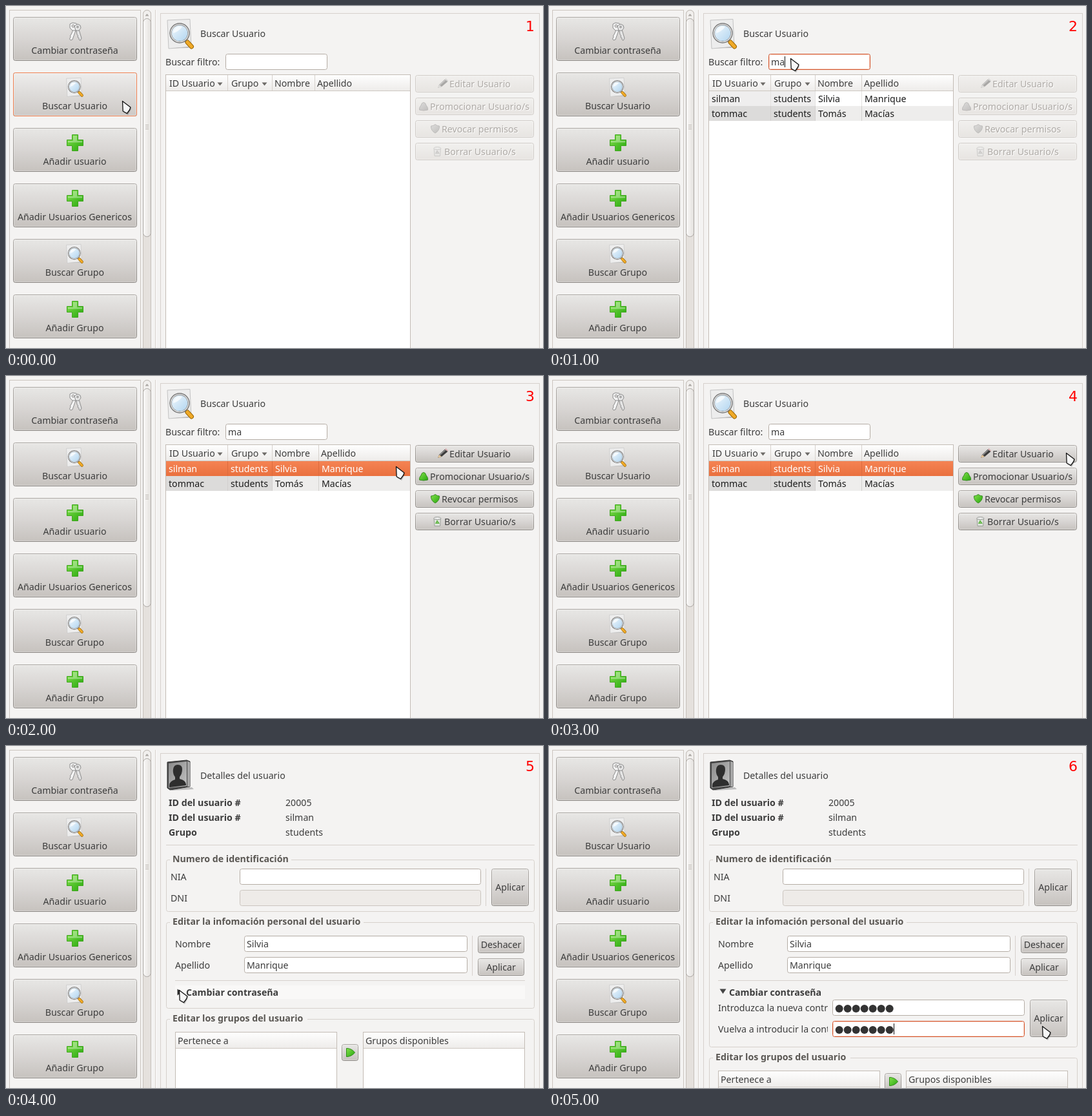
An HTML page for the animation above (6000 ms loop, 832 by 530 pixels).

```html
<!DOCTYPE html>
<html lang="es">
<head>
<meta charset="utf-8">
<title>Gestor de usuarios</title>
<style>
html, body { margin: 0; width: 100%; height: 100%; overflow: hidden; background: #f4f3f2; }
svg { display: block; width: 832px; height: 530px; }
text { font: 14.2px "Noto Sans", sans-serif; fill: #3c3c3c; white-space: pre; }
.bold { font-weight: 700; }
.legend { font-weight: 700; fill: #5a5753; }
.mid { text-anchor: middle; }
.off { fill: #aeaaa6; }
.emboss { fill: #fff; }
.cell { fill: #1c1c1c; }
.picked { fill: #fff; }
.step { font: 22px "DejaVu Sans", sans-serif; fill: #f00; }
.timed { visibility: hidden; animation: 6s step-end infinite; }
@keyframes show1 { 0% { visibility: visible } 16.6667%, 100% { visibility: hidden } }
@keyframes show2 { 0% { visibility: visible } 33.3333%, 100% { visibility: hidden } }
@keyframes show3 { 0% { visibility: visible } 50%, 100% { visibility: hidden } }
@keyframes show4 { 0% { visibility: visible } 66.6667%, 100% { visibility: hidden } }
</style>
</head>
<body>
<svg id="stage" viewBox="0 0 832 530">
<defs>
  <linearGradient id="face" x2="0" y2="1"><stop stop-color="#e8e7e5"/><stop offset=".5" stop-color="#d8d5d3"/><stop offset="1" stop-color="#c6c2be"/></linearGradient>
  <linearGradient id="edge" x2="0" y2="1"><stop stop-color="#aaa6a2"/><stop offset="1" stop-color="#8b8783"/></linearGradient>
  <linearGradient id="lit" x2="0" y2="1"><stop stop-color="#eeedec"/><stop offset="1" stop-color="#cdc9c6"/></linearGradient>
  <linearGradient id="faint" x2="0" y2="1"><stop stop-color="#f1f0ee"/><stop offset="1" stop-color="#e7e4e1"/></linearGradient>
  <linearGradient id="head" x2="0" y2="1"><stop stop-color="#fefefe"/><stop offset="1" stop-color="#eeecea"/></linearGradient>
  <linearGradient id="thumb" x2="1" y2="0"><stop stop-color="#fbfaf9"/><stop offset="1" stop-color="#e3e0dd"/></linearGradient>
  <linearGradient id="pick" x2="0" y2="1"><stop stop-color="#f58353"/><stop offset="1" stop-color="#e9703e"/></linearGradient>
  <linearGradient id="green" x2="1" y2="1"><stop stop-color="#84e04c"/><stop offset="1" stop-color="#27a80e"/></linearGradient>
  <linearGradient id="glass" x2="1" y2="1"><stop stop-color="#f4fafe"/><stop offset="1" stop-color="#aed3ef"/></linearGradient>
  <linearGradient id="cover" x2="1" y2="1"><stop stop-color="#8a8a8a"/><stop offset="1" stop-color="#c2c2c2"/></linearGradient>
  <clipPath id="labelClip"><path d="M255 390H432V460H255z"/></clipPath>

  <g id="search">
    <path d="M1 2 36 .5 38 43 3 46z" fill="#ededed" stroke="#c3c3c3"/>
    <path d="M6 45.5 38 43 33 45z" fill="#bbb"/>
    <path d="M28 32 33 37" stroke="#888" stroke-width="4"/>
    <path d="M32 36 38.5 43" stroke="#9b6708" stroke-width="7" stroke-linecap="round"/>
    <path d="M32 36 38.5 43" stroke="#f0aa28" stroke-width="5" stroke-linecap="round"/>
    <circle cx="20" cy="22" r="14" fill="url(#glass)" stroke="#777" stroke-width="3.4"/>
    <circle cx="20" cy="22" r="13.6" fill="none" stroke="#e9e9e9" stroke-width="1.4"/>
    <path d="M10 22A10 10 0 0 1 24 12.5Q18 20 10 22z" fill="#fff" opacity=".7"/>
  </g>
  <g id="plus">
    <path d="M8.500.5h9v8h8v9h-8v8h-9v-8h-8v-9h8z" fill="url(#green)" stroke="#3fa61f"/>
    <path d="M10 2h6v8h8v2.500H2V10h8z" fill="#fff" opacity=".35"/>
  </g>
  <g id="keys" stroke="#8c8c8c" fill-rule="evenodd">
    <path d="M7 12 11 13 7 24 6 27 3 28 1.500 26 3 23 2.500 21 4 19z" fill="#f5f5f5"/>
    <path d="M12 13 16 11.500 20 25 18 28.500 16 27 16 24.500 14 23.500 14.500 21 13 19z" fill="#e4e4e4"/>
    <path d="M2 3 6 1 12 2 14 7 11 13 6 13 2 9zM7 4a2 2 0 1 0 .1 0z" fill="#f2f2f2"/>
    <path d="M9 6 14 3 18 5 19 9 16 13 11 13zM14 6a1.500 1.500 0 1 0 .1 0z" fill="#e8e8e8"/>
  </g>
  <g id="pencil">
    <path d="M0 15 2 10 11 1.5 15.5 5 6 13z" fill="#3d3d3d"/>
    <path d="M3 10.5 12 2.5" stroke="#999" stroke-width="1.3"/>
    <path d="M0 15 2 10 6 13z" fill="#e6c79b"/>
    <path d="M11 1.5 12.5 0 16 3.5 15.5 5z" fill="#d9aeb0"/>
  </g>
  <path id="hill" d="M.5 12Q0 8 3 5Q4 .5 7 .5T11 5Q14 8 13.5 12Q7 14 .5 12z" fill="url(#green)" stroke="#378b22"/>
  <path id="shield" d="M.5 3Q4 3 7 .5Q10 3 13.5 3Q14 10 7 14Q0 10 .5 3z" fill="url(#green)" stroke="#378b22"/>
  <g id="bin">
    <path d="M1 3 2 14.5H10.5L11.5 3z" fill="#dfe3dd" stroke="#9a9d98"/>
    <ellipse cx="6.3" cy="2.5" rx="5.5" ry="1.9" fill="#f5f5f5" stroke="#8d908b"/>
    <path d="M4 10 6 6.5 8.5 10z" fill="none" stroke="#55b234" stroke-width="1.4"/>
  </g>
  <g id="pointer">
    <path d="M2 3 14.5 12 9 22 2 18z" opacity=".2"/>
    <path d="M.5.5 13 10 11.5 14 7.5 19.5 1.2 16z" fill="#f7f7f7" stroke="#111" stroke-width="1.3" stroke-linejoin="round"/>
  </g>
  <g id="profile">
    <path d="M4 46 39 43 42 46 8 48z" fill="#bbb"/>
    <path d="M1 4 31 1 36 3 36 42 5 47 1 44z" fill="#4a4a4a" stroke="#2c2c2c"/>
    <path d="M32 2.5 36 4 36 42 32 42z" fill="#a6a6a6"/>
    <path d="M3 6 31 3 31 41 3 44z" fill="url(#cover)"/>
    <path d="M4 40Q4 34 13 31L13 27Q9 22 10 15Q11 8 17 8Q24 8 24 15Q24 22 20 27L20 30Q29 32 30 38L30 40 4 43z" fill="#2e2e2e"/>
  </g>
</defs>
</svg>
<script>
const text = (x, y, label, cls = '') => `<text x="${x}" y="${y}" class="${cls}">${label}</text>`;
const use = (id, x, y, scale = 1, extra = '') =>
  `<use href="#${id}" transform="translate(${x} ${y}) scale(${scale})" ${extra}/>`;
const box = (x, y, w, h, fill, stroke = 'none', r = 0) =>
  `<rect x="${x + .5}" y="${y + .5}" width="${w - 1}" height="${h - 1}" rx="${r}" fill="${fill}" stroke="${stroke}"/>`;
const fill = (x, y, w, h, color) => `<rect x="${x}" y="${y}" width="${w}" height="${h}" fill="${color}"/>`;
const path = (d, color) => `<path d="${d}" fill="${color}"/>`;
const vline = (x, y, h, color = '#d6d1cc') => fill(x, y, 1, h, color);
const hline = (x, y, w, color = '#d6d1cc') => fill(x, y, w, 1, color);

// Visible from second `start` for `count` seconds of the loop.
const show = (start, count, markup) =>
  `<g class="timed" style="animation-name:show${count};animation-delay:${start - 6}s">${markup}</g>`;

const button = (x, y, w, h, face = 'face', edge = 'url(#edge)') =>
  box(x, y, w, h, `url(#${face})`, edge, 3) +
  box(x + 1, y + 1, w - 2, h - 2, 'none', 'rgba(255,255,255,.3)', 2);
const labelled = (x, y, w, h, label) =>
  button(x, y, w, h) + text(x + w / 2, y + h / 2 + 5, label, 'mid');
const entry = (x, y, w, edge = '#b5ada5', face = '#fff') => box(x, y, w, 25, face, edge, 3);
const focusedEntry = (x, y, w) =>
  entry(x, y, w, '#d4532a') + box(x + 1, y + 1, w - 2, 23, 'none', '#f7d5c8', 2);

function sidebar() {
  const items = [
    ['keys', 'Cambiar contraseña'], ['search', 'Buscar Usuario'], ['plus', 'Añadir usuario'],
    ['plus', 'Añadir Usuarios Genericos'], ['search', 'Buscar Grupo'], ['plus', 'Añadir Grupo'],
  ];
  const icons = {
    keys: y => use('keys', 97, y + 8),
    search: y => use('search', 93, y + 8, .64),
    plus: y => use('plus', 94, y + 10),
  };
  const top = i => 17 + 86 * i;
  return box(5, 6, 204, 540, 'none', '#cbc5bf') +
    items.map((_, i) => button(11, top(i), 192, 68)).join('') +
    show(0, 1, button(11, 103, 192, 68, 'lit', '#ee7f50')) +
    items.map(([icon, label], i) => icons[icon](top(i)) + text(106.5, top(i) + 57, label, 'mid')).join('') +
    box(212, 6, 13, 560, '#e5e1dd', '#c6c0ba', 6) +
    box(212, 6, 13, 30, '#f1efed', '#c0bab4', 6) + path('M215.5 15.5h6L218.5 12z', '#a9a5a1') +
    box(212, 19, 13, 339, 'url(#thumb)', '#aaa6a2', 6) +
    [184, 187, 190].map(y => hline(216, y, 5, '#bcb7b2')).join('') +
    vline(231, 6, 524) + vline(232, 6, 524, '#fcfcfc');
}

function actions(enabled) {
  const rows = [
    ['Editar Usuario', 687, 'pencil', 669, 5], ['Promocionar Usuario/s', 657, 'hill', 640, 7],
    ['Revocar permisos', 675, 'shield', 658, 6], ['Borrar Usuario/s', 679, 'bin', 662, 6],
  ];
  return rows.map(([label, x, icon, iconX, dy], i) => {
    const y = 107 + 35 * i;
    return enabled
      ? button(634, y, 184, 27) + use(icon, iconX, y + dy) + text(x, y + 19, label)
      : button(634, y, 184, 27, 'faint', '#d0ccc8') +
        use(icon, iconX, y + dy, 1, 'style="filter:grayscale(1)" opacity=".38"') +
        text(x + 1, y + 20, label, 'emboss') + text(x, y + 19, label, 'off');
  }).join('');
}

const userRow = (y, cells, cls) =>
  [252, 348, 417, 489].map((x, i) => text(x, y, cells[i], cls)).join('');
const first = ['silman', 'students', 'Silvia', 'Manrique'];
const second = ['tommac', 'students', 'Tomás', 'Macías'];
const lastColumn = edge => vline(edge, 107, 24) + text(edge + 4, 125, 'Apellido');
const rowLines = (y, color) => [343, 412, 484].map(x => vline(x, y, 23, color)).join('');

function searchView() {
  return show(0, 4,
      use('search', 249, 20) + text(301, 48, 'Buscar Usuario') + text(247, 92, 'Buscar filtro:') +
      entry(340, 74, 158) + box(247, 106, 380, 440, '#fff', '#c3bcb5') +
      fill(248, 107, 378, 24, 'url(#head)') + hline(248, 131, 378, '#cdc7c1') +
      vline(343, 107, 24) + vline(412, 107, 24) +
      text(253, 125, 'ID Usuario') + text(349, 125, 'Grupo') + text(416, 125, 'Nombre') +
      path('M327.5 118.5h8l-4 5z', '#6d6a67') + path('M396.5 118.5h8l-4 5z', '#6d6a67')) +
    show(0, 1, lastColumn(478)) +
    show(0, 2, actions(false)) +
    show(1, 1, focusedEntry(340, 74, 158) + vline(365, 78, 17, '#111')) +
    show(1, 3,
      lastColumn(484) + text(344, 92, 'ma') +
      fill(248, 132, 165, 23, '#efeeee') + fill(248, 155, 378, 23, '#eeedec') +
      fill(248, 155, 165, 23, '#dcdbda') + rowLines(155, '#d2d0ce') + userRow(172, second, 'cell')) +
    show(1, 1, rowLines(132, '#e3e1df') + userRow(149, first, 'cell')) +
    show(2, 2, fill(248, 132, 378, 23, 'url(#pick)') + rowLines(132, '#dc6c3e') +
      userRow(149, first, 'picked') + actions(true));
}

// Group box whose top edge leaves room for the caption.
function group(y, h, label, gapEnd) {
  const top = y + .5, bottom = y + h + .5;
  return `<path d="M254 ${top}H251.5q-3 0-3 3V${bottom - 3}q0 3 3 3H815.5q3 0 3-3V${top + 3}q0-3-3-3H${gapEnd}" fill="none" stroke="#d6d1cc"/>` +
    text(258, y + 4, label, 'legend');
}

const list = (x, y, label) =>
  box(x, y, 251, 140, '#fff', '#c3bcb5') + fill(x + 1, y + 1, 249, 24, 'url(#head)') +
  hline(x + 1, y + 25, 249, '#cdc7c1') + text(x + 4, y + 19, label);

const groupsSection = (y, buttonY) =>
  group(y, 200, 'Editar los grupos del usuario', 467) +
  list(262, y + 20, 'Pertenece a') + list(553, y + 20, 'Grupos disponibles') +
  button(520, buttonY, 26, 26) +
  `<path d="M527.5 ${buttonY + 6.5}q8 0 13 6.5q-5 6.500-13 6.500z" fill="url(#green)" stroke="#2c8a17"/>`;

const dots = y => Array.from({ length: 7 }, (_, i) =>
  `<circle cx="${449.7 + 13 * i}" cy="${y}" r="6" fill="#333"/>`).join('');

function detailView() {
  const facts = [['ID del usuario #', '20005'], ['ID del usuario #', first[0]], ['Grupo', 'students']];
  const heading = 'Editar la infomación personal del usuario';
  const expander = text(279, 387, 'Cambiar contraseña', 'bold');
  return show(4, 2,
      use('profile', 249, 21) + text(301, 51, 'Detalles del usuario') +
      facts.map(([k, v], i) => text(252, 93 + 23 * i, k, 'bold') + text(433, 93 + 23 * i, v)).join('') +
      hline(248, 153, 571) +
      group(176, 80, 'Numero de identificación', 442) +
      text(255, 208, 'NIA') + entry(362, 190, 374) +
      text(255, 241, 'DNI') + entry(362, 223, 374, '#cbc5bf', '#eeebe8') +
      vline(743, 190, 58) + labelled(752, 190, 58, 58, 'Aplicar') +
      text(262, 312, 'Nombre') + entry(369, 294, 346) + text(373, 312, first[2]) +
      text(262, 345, 'Apellido') + entry(369, 327, 346) + text(373, 345, first[3]) +
      vline(722, 294, 62) + labelled(731, 294, 72, 27, 'Deshacer') + labelled(731, 329, 72, 27, 'Aplicar') +
      hline(262, 363, 542)) +
    show(4, 1, group(273, 133, heading, 554) + fill(262, 371, 542, 21, '#f9f8f7') +
      path('M265.5 376.5v10l7-5z', '#333') + expander + groupsSection(423, 462)) +
    show(5, 1, group(273, 193, heading, 554) + path('M264.5 376.5h10l-5 7.5z', '#444') + expander +
      `<g clip-path="url(#labelClip)">${text(262, 411, 'Introduzca la nueva contraseña')}${text(262, 444, 'Vuelva a introducir la contraseña')}</g>` +
      entry(439, 393, 298) + dots(407) + focusedEntry(439, 426, 298) + dots(440) +
      vline(534, 430, 17, '#111') + labelled(745, 393, 58, 58, 'Aplicar') + groupsSection(483, 507));
}

const stops = [[180, 147], [374, 81], [604, 140], [801, 119], [268, 378], [764, 434]];
const overlay = stops.map(([x, y], i) =>
  show(i, 1, use('pointer', x, y) + text(805, 39, i + 1, 'step'))).join('');

document.getElementById('stage').insertAdjacentHTML('beforeend',
  sidebar() + box(239, 11, 588, 560, 'none', '#d6d1cc') + searchView() + detailView() + overlay);
</script>
</body>
</html>
```
